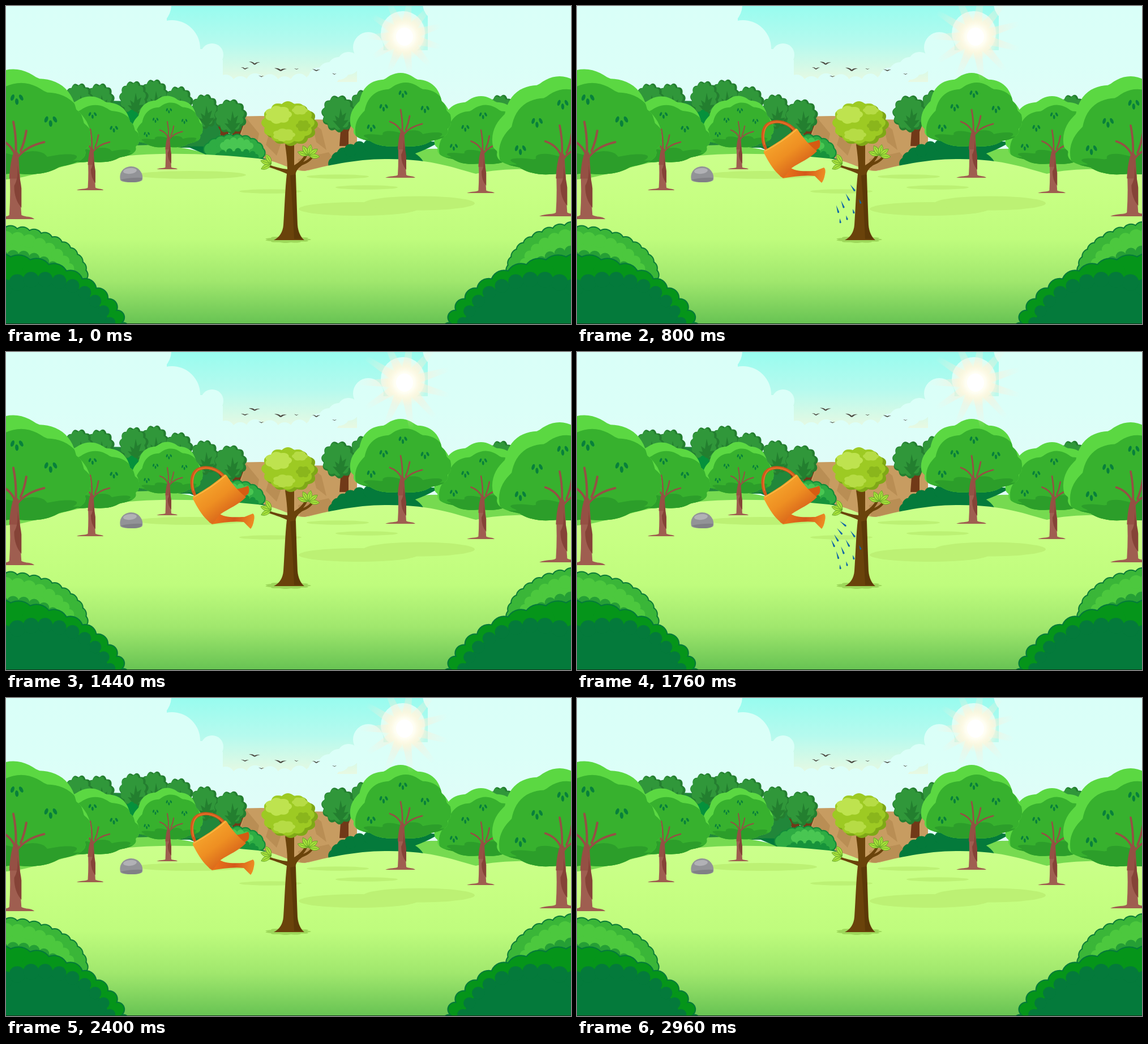
Write an HTML page with a canvas that moves like this. It is 998 px wide and 561 px high and loops after 3 s.

```html
<!DOCTYPE html>
<html lang="en">
<head>
<meta charset="utf-8">
<title>Watering a young tree</title>
<style>
html, body { margin: 0; width: 100%; height: 100%; overflow: hidden; }
canvas { display: block; width: 998px; height: 561px; }
</style>
</head>
<body>
<canvas id="stage" width="998" height="561"></canvas>
<script>
const W = 998, H = 561, LOOP = 3000, TAU = Math.PI * 2;
const view = document.getElementById('stage').getContext('2d');
let g = view;

// ---------- helpers ----------
const mix = (a, b, u) => a + (b - a) * u;

function shades(grad, ...colors) {
  colors.forEach((c, i) => grad.addColorStop(i / (colors.length - 1), c));
  return grad;
}
const fade = (y0, y1, ...colors) => shades(g.createLinearGradient(0, y0, 0, y1), ...colors);

function fill(shape, color) {
  g.fillStyle = color;
  g.fill(shape);
}
const path = (d, color) => fill(new Path2D(d), color);

function line(d, color, width) {
  g.strokeStyle = color;
  g.lineWidth = width;
  g.lineCap = g.lineJoin = 'round';
  g.stroke(new Path2D(d));
}

function oval(x, y, rx, ry, color, turn = 0) {
  g.fillStyle = color;
  g.beginPath();
  g.ellipse(x, y, rx, ry, turn, 0, TAU);
  g.fill();
}

function place(x, y, sx, sy, draw) {
  g.save();
  g.translate(x, y);
  g.scale(sx, sy);
  draw();
  g.restore();
}

// puffy egg: separate radii above and below its centre, n lobes on the rim
function puffy(x, y, rx, up, down, n, depth, phase = 0) {
  const p = new Path2D();
  for (let i = 0; i < 120; i++) {
    const a = i / 120 * TAU, s = Math.sin(a);
    const r = 1 - depth * (1 - Math.abs(Math.cos(n * a / 2 + phase)));
    p.lineTo(x + Math.cos(a) * rx * r, y + s * (s < 0 ? up : down) * r);
  }
  p.closePath();
  return p;
}

// half-buried ellipse whose rim carries round bumps shrinking from r0 to r1;
// a0 and a1 are angles from the top
function mound(x, y, rx, ry, a0, a1, n, r0, r1, color, rim) {
  const pass = (c, inset) => {
    oval(x, y, rx, ry, c);
    for (let i = 0; i <= n; i++) {
      const u = i / n, a = mix(a0, a1, u), r = mix(r0, r1, u) - inset;
      oval(x + Math.sin(a) * rx, y - Math.cos(a) * ry, r, r, c);
    }
  };
  if (rim) pass(rim, 0);
  pass(color, rim ? 2 : 0);
}

// ---------- scenery ----------
function sky() {
  g.fillStyle = fade(0, 135, '#98fcef', '#b6faee', '#e9f9e2');
  g.fillRect(0, 0, W, H);
  const cloud = fade(0, 210, '#d9fff8', '#dbfff8', '#e1fcf8');
  g.fillStyle = cloud;
  g.fillRect(0, 134, W, 200);
  g.fillRect(0, 0, 284, 140);
  g.fillRect(745, 0, 253, 140);
  g.fillRect(0, 76, 350, 60);
  g.fillRect(0, 95, 383, 45);
  g.fillRect(620, 78, 130, 60);
  const puff = (x, y, r) => oval(x, y, r, r, cloud);
  puff(252, -2, 40);
  puff(293, 75, 50);
  puff(364, 86, 20);
  puff(770, -5, 34);
  puff(701, 48, 39);
  puff(640, 73, 27);
  for (let i = 0; i < 4; i++) puff(605 - i * 17, 101 + i * 9, 20);
  for (let i = 0; i < 7; i++) puff(388 + i * 26, 137 + 3 * Math.sin(i * 2), 16);
}

function farTree(x, y, rx = 26, ry = 31) {
  fill(puffy(x, y, rx, ry, ry, 11, 0.13, 1), '#247e30');
  fill(puffy(x - 2, y - 1, rx * 0.9, ry * 0.9, ry * 0.9, 11, 0.13, 1), '#30973a');
  path(`M${x + 3} ${y - 10}l3 13 7-5-4 14 8-1-14 17-14-16 7 1-3-10 7 5Z`, '#237f2f');
}

function farStem(x, y) {
  place(x, y, 1, 1, () =>
    path('M0 -22L4 -9 10 -22 14 -21 8 -5 8 20 -8 20 -6 -7 -13 -20 -9 -21 -3 -11Z', '#713918'));
}

function distance() {
  path('M395 196Q480 190 525 201Q570 198 620 206V280L520 292 400 280Z', '#c79c61');
  path('M424 197L412 240 440 258 447 225ZM470 208L459 245 478 264 490 230ZM540 205L548 240 566 254 557 218ZM516 270L570 258 585 278 520 292Z', '#b98e54');

  path('M90 175Q250 150 385 205L372 250H90Z', '#21873a');
  [[166, 167], [129, 167], [262, 160], [226, 163], [305, 172], [351, 186]].forEach(p => farTree(...p));
  fill(puffy(222, 203, 14, 20, 20, 8, 0.1), '#05913c');
  farStem(385, 228);
  farStem(406, 230);
  farTree(397, 195, 29);
  farTree(634, 180, 28, 33);
  farStem(597, 227);
  farTree(588, 190, 31, 33);
  farTree(874, 187);
}

function land() {
  path('M0 290Q110 268 215 247Q290 240 360 262V310H0Z', '#76da50');
  path('M650 275Q750 222 998 290V310H650Z', '#76da50');
  path('M320 248Q370 244 460 270L400 282Z', '#047a3b');
  mound(403, 262, 45, 25, -1.2, 1.45, 8, 13, 11, '#2eac43', '#138a3a');
  mound(408, 250, 24, 12, -1.3, 1.3, 5, 7, 6, '#49c652');
  mound(408, 268, 34, 12, -1.3, 1.4, 6, 6, 5, '#17933b');
  mound(660, 285, 80, 40, -1.4, 0, 6, 12, 10, '#047a3b');
  path('M640 245Q700 233 765 240Q735 259 690 270H640Z', '#047a3b');

  path('M0 306C50 302 90 281 170 269C255 257 350 259 445 269C485 273 503 292 530 291C565 282 620 269 676 270C755 270 795 287 830 296C870 286 930 286 998 291V561H0Z',
    fade(260, 561, '#cbff8c', '#c7ff83', '#bffc7d', '#a0e76d', '#67c353'));
  const shade = '#bcf174';
  oval(327, 298, 97, 7, shade);
  oval(622, 358, 105, 12, shade);
  oval(730, 348, 98, 12.5, shade);
  [[467, 327], [586, 301], [637, 320]].forEach(([x, y]) => oval(x, y, 55, 3.7, shade));
}

// woodland tree, origin at the trunk base
function woodTree(x, y, s, wide = 1) {
  place(x, y, s, s, () => {
    path('M-27 0C-18 -4 -8 -2 -5 -5Q-3 -35 -5 -64H8Q8 -30 10 -5C15 -2 22 -4 26 0Z', '#9f5e50');
    const dome = (dx, dy) => puffy(dx, dy - 92, 90, 93, 38, 9, 0.07, 0.8);
    g.save();
    g.scale(wide, 1);
    const crown = dome(0, 0);
    fill(crown, '#5bd842');
    g.clip(crown);
    fill(dome(9, 17), '#37b12e');
    fill(puffy(12, -60, 100, 24, 40, 13, 0.25), '#2c9e2a');
    for (let i = 0; i < 12; i++) {
      const c = Math.floor(i / 3), k = i % 3;
      oval([4, -30, 43, -52][c] + k * 5 - 5, [-150, -126, -123, -90][c] + (k % 2) * 5,
        4, 2, '#08803b', 1.9 - k * 0.4);
    }
    g.restore();
    path('M-5 -50Q-4 -72 1 -84L6 -82Q7 -70 8 -50Z', '#955044');
    line('M3 -80Q4 -100 0 -120M2 -80Q-4 -94 -19 -99M5 -76Q16 -90 38 -95M9 -84Q14 -96 16 -109', '#955044', 2.8);
    path('M5 -76C4 -65 9 -49 10 -38V-14Q1 -24 1 -41C7 -51 5 -63 5 -76Z', '#854337');
  });
}

function paleShrub() {
  mound(0, 480, 133, 77, -0.1, 1.5, 10, 17, 13, '#3ab638', '#0c7c38');
  mound(0, 490, 118, 80, 0, 1.4, 8, 13, 9, '#4cc83e');
  mound(15, 525, 108, 84, -0.2, 1.2, 8, 11, 8, '#259f35');
}

function darkShrub() {
  mound(0, 600, 213, 132, -0.05, 1.33, 9, 33, 11, '#05951a', '#047a3b');
  mound(60, 600, 132, 118, -0.5, 1.4, 10, 15, 9, '#047a3b');
}

function rock() {
  path('M202 307C199 294 207 284 220 283C233 282 243 294 241 306Q240 311 222 311Q204 311 202 307Z', '#929397');
  oval(219, 291, 12, 5, '#b1b1b5', -0.1);
  path('M203 306Q224 302 240 303Q241 311 222 311Q208 311 203 306Z', '#808085');
}

// ---------- the young tree ----------
function fan(x, y, n, from, to, reach) {
  for (let i = 0; i < n; i++) {
    g.save();
    g.translate(x, y);
    g.rotate(mix(from, to, i / (n - 1)));
    const d = `M${reach} 0q10 -8 19 0q-9 8 -19 0Z`;
    path(d, '#a9e23c');
    line(d + `M${reach} 0h15`, '#65a528', 0.9);
    g.restore();
  }
}

function youngTree() {
  fill(puffy(498, 412, 41, 6, 6, 11, 0.15), '#9dd75a');
  path('M473 413C483 408 489 399 490 386C492 358 493 322 496 296C486 291 472 287 461 283L462 279C475 284 487 287 497 288C497 273 495 258 493 244H509V281C520 275 528 265 531 255L535 256C533 264 529 270 525 275C533 272 540 266 543 258L546 260C543 270 534 277 523 281C515 287 511 292 512 299C513 330 514 362 515 386C516 399 521 408 527 413Z', '#6a430b');
  path('M502 299Q506 345 509 411H523Q515 400 514 386L511 297Z', '#5c3908');
  fill(puffy(503, 209, 48, 38, 38, 12, 0.1), '#7fa817');
  fill(puffy(498, 206, 47, 38, 37, 12, 0.1), '#9dca23');
  fill(puffy(525, 211, 13, 10, 11, 6, 0.2), '#8ab61c');
  fill(puffy(481, 191, 24, 15, 17, 7, 0.14), '#bee34f');
  fill(puffy(491, 227, 20, 11, 12, 7, 0.14), '#b6dc45');
  fill(puffy(519, 184, 14, 9, 8, 6, 0.14), '#b6dc45');
  fan(469, 279, 3, 2.7, 4.2, 1);
  fan(534, 264, 5, -2.8, 0.1, 1);
}

// ---------- moving parts ----------
function sun(t) {
  const s = 0.86 + 0.2 * Math.sqrt(Math.sin(t / LOOP * Math.PI));
  place(704, 54, 1, 1, () => {
    const beam = shades(g.createRadialGradient(0, 0, 15, 0, 0, 78 * s),
      'rgba(255,240,212,.7)', 'rgba(255,236,212,.35)', 'rgba(255,238,220,0)');
    g.fillStyle = beam;
    for (let i = 0; i < 11; i++) {
      g.save();
      g.rotate(i / 11 * TAU + 0.28);
      g.fill(new Path2D(`M20 -8L${78 * s} -4V4L20 8Z`));
      g.restore();
    }
    oval(0, 0, 42, 42, shades(g.createRadialGradient(0, 0, 6, 0, 0, 42),
      '#ffffff', '#fffef2', 'rgba(255,248,220,.6)', 'rgba(255,243,220,0)'));
    oval(0, 0, 15, 16, '#fff');
  });
}

const flock = [[439, 101, 10], [422, 110, 7], [485, 112, 11], [513, 111, 4],
  [548, 113, 7], [451, 124, 5], [580, 120, 4]];

function birds(t) {
  flock.forEach(([x, y, r], i) => {
    const lift = 0.24 + 0.06 * Math.cos(t / LOOP * TAU * 3 + i);
    place(x, y, r, r, () => path(
      `M-1 ${-lift}Q-.3 ${-lift - 0.04} 0 .05Q.35 ${-lift} 1 ${-lift + 0.12}Q.45 ${-lift + 0.2} .2 .2Q0 .32 -.16 .2Q-.4 ${-lift + 0.2} -1 ${-lift}Z`, '#4b4840'));
  });
}

// pops in with a small overshoot and leaves the same way
function canScale(t) {
  const p = Math.min(1, (Math.min(t, LOOP - t) - 40) / 267) - 1;
  return p <= -1 ? 0 : Math.max(0, 1 + 2.7 * p ** 3 + 1.7 * p ** 2);
}

function can(t) {
  const s = canScale(t);
  if (!s) return;
  place(384, 257, s, s, () => {
    g.translate(-384, -257);
    line('M333 251C326 235 326 215 338 208C354 199 374 206 386 221', '#cf571b', 5.5);
    line('M331 244C328 229 330 214 340 207C354 201 371 206 382 217', '#e4742a', 2);
    path('M406 242C413 241 421 239 428 236Q431 243 428 250L417 259Z', '#d55c12');
    path('M374 283C386 294 406 291 421 291L436 285Q440 287 438 297Q436 308 432 312L420 300C402 298 382 301 363 304Z',
      shades(g.createLinearGradient(370, 285, 438, 300), '#e87319', '#d4581a', '#ee8d23'));
    path('M330 259Q329 256 332 254C350 244 371 230 385 217Q388 215 390 218C399 233 412 247 424 256C412 269 393 276 379 286C372 291 369 302 363 303Q360 302 357 298C345 287 338 274 330 259Z',
      shades(g.createLinearGradient(354, 230, 396, 286), '#f6a42c', '#ee8f22', '#d8641a'));
    line('M332 256C351 246 372 232 388 218', '#ffbf4a', 1.4);
  });
}

// four streams (k) fall along arcs in four rows (r); rows light up in turn
function water(t) {
  const start = 509, stepMs = 70, steps = 7, cycles = 3;
  const step = Math.floor((t - start) / stepMs);
  if (step < 0 || step >= steps * cycles + 6) return;
  const phase = step % steps;
  for (let r = Math.max(0, phase - 2); r <= Math.min(3, phase); r++) {
    for (let k = 0; k < 4; k++) {
      const vx = 23 - 3.4 * k, ax = 0.13 * k - 2;
      const vy = 9 + 3.9 * k + k * (3 - k), ay = 3 - k;
      const half = r % 3 ? 7.5 : 4.5;
      g.save();
      g.translate(449 - 2.7 * k + vx * r + ax * r * r, 291 + 8.7 * k + vy * r + ay * r * r);
      g.rotate(Math.atan2(vy + 2 * ay * r, vx + 2 * ax * r));
      path(`M${-half} 0L${half - 2} -1.6Q${half + 1} 0 ${half - 2} 1.6Z`, '#0f66a6');
      g.restore();
    }
  }
}

// ---------- still layer, drawn once ----------
const still = document.createElement('canvas');
still.width = W;
still.height = H;
g = still.getContext('2d');
sky();
distance();
land();
woodTree(285, 288, 0.7);
woodTree(839, 330, 0.925);
woodTree(149, 325, 0.895, 1.08);
woodTree(697, 303, 1);
woodTree(13, 376, 1.43, 1.07);
woodTree(978, 371, 1.335);
rock();
paleShrub();
darkShrub();
place(1028, -9, -1, 1, paleShrub);
place(998, 0, -1.04, 1, darkShrub);
g.fillStyle = '#12321a';
g.fillRect(0, 560, W, 1);
g = view;

function frame(t) {
  g.drawImage(still, 0, 0);
  sun(t);
  birds(t);
  youngTree();
  can(t);
  water(t);
}

let start;
function tick(now) {
  start ??= now;
  frame((now - start) % LOOP);
  requestAnimationFrame(tick);
}
frame(0);
requestAnimationFrame(tick);
</script>
</body>
</html>
```
